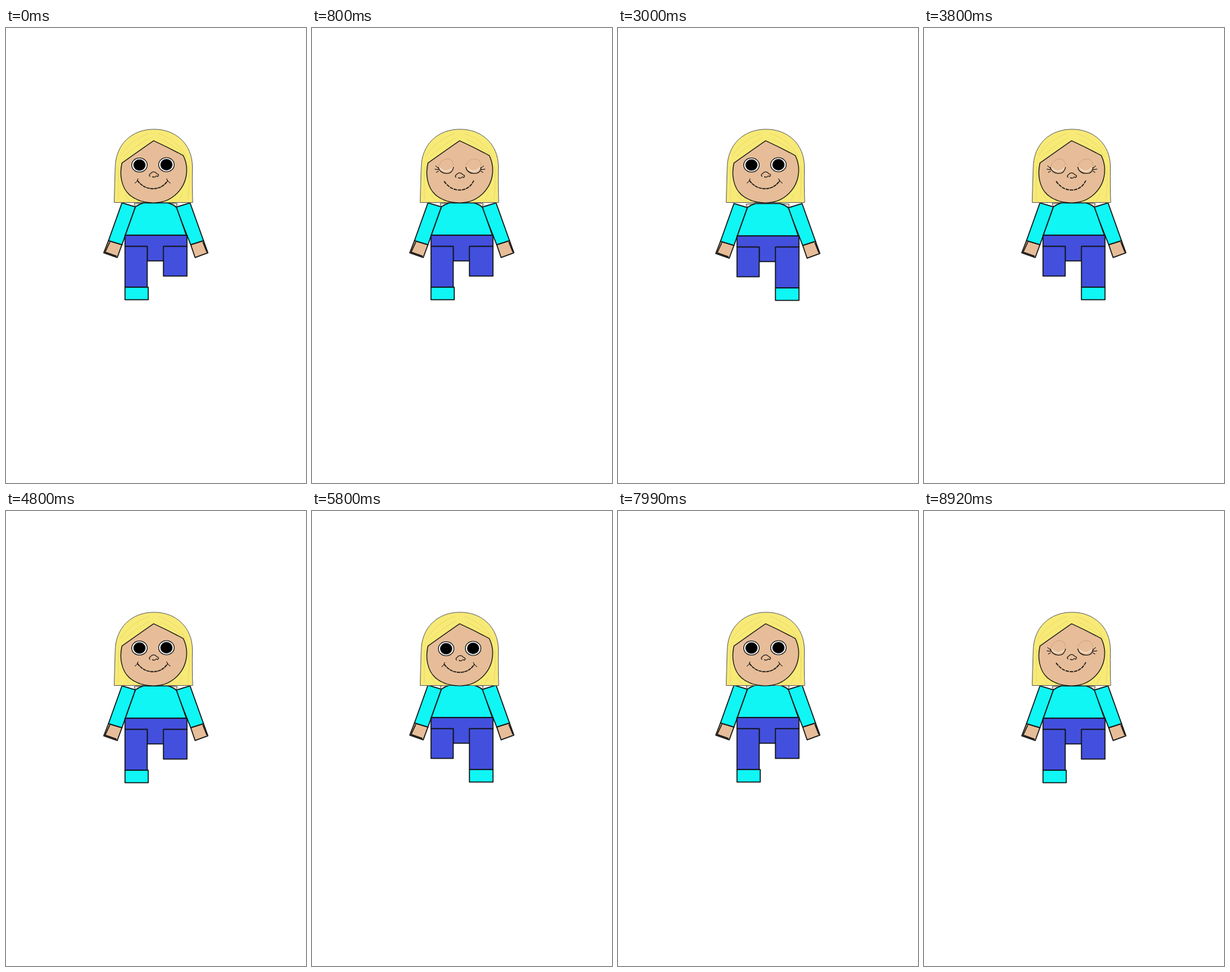
Write an HTML page that moves like this. It is 445 by 674 pixels and loops after 8.99 s.

```html
<!DOCTYPE html>
<html lang="en">
<head>
<meta charset="utf-8">
<title>Walking girl</title>
<style>
  html, body { margin: 0; width: 100%; height: 100%; overflow: hidden; background: #fff; }
  svg { display: block; }
  .shirt { fill: #10f6f5; }
  .jeans { fill: #4250dd; }
  .skin { fill: #e6bd98; }
  .line { fill: none; }
</style>
</head>
<body>
<svg width="445" height="674" viewBox="0 0 445 674" stroke="#111" stroke-width="1.5" stroke-linejoin="round">
  <g id="body">
    <path class="skin" d="M152 315L172 321L165 340L145 333Z"/>
    <path class="skin" d="M293 315L274 321L280.500 340L299.500 333Z"/>
    <path class="line" d="M154 317L147 332L164 338M292 317L298 332"/>
    <path d="M190 260L203 259L192 265ZM254 260L241 259L253 265Z" fill="#f3e6d5" stroke-width=".7"/>
    <path class="shirt" d="M172 259L192 265L172 321L152 315Z"/>
    <path class="shirt" d="M273 259L252 265.500L274 321L293 315Z"/>
    <path class="shirt" d="M177 307L192 265Q197 261 204 259H240Q248 261 253 266L267.500 307Z"/>
    <path class="jeans" d="M176.500 307H268.500V323.500H234V345H209.500V323.500H176.500Z"/>
    <g id="leftDown">
      <path class="jeans" d="M176.500 323.500H209.500V384H176.500ZM233.500 323.500H268.500V367.500H233.500Z"/>
      <path class="shirt" d="M176.500 384H211V402.500H176.500Z"/>
    </g>
    <g id="rightDown">
      <path class="jeans" d="M176.500 323.500H209.500V367.500H176.500ZM233.500 323.500H268.500V384H233.500Z"/>
      <path class="shirt" d="M233.500 384H268.500V402.500H233.500Z"/>
    </g>
  </g>

  <path d="M160.500 258.500Q161 235 162 208C162 172 187 150 219.500 150S276 172 276.500 205Q276 235 277 258.500Z" fill="#f8ea76" stroke="#666" stroke-width="1"/>
  <path class="line" d="M167 205Q166 230 167 254M169 190Q184 166 212 156M175 190Q193 174 214 162M226 156Q256 166 268 192M229 164Q249 174 264 188M271 205Q273 230 270 254M176 246L183 256M262 245L256 256" stroke="#eadb70" stroke-width="1"/>
  <path class="skin" d="M219 167Q203 178 172 200C168 217 171 236 183 247Q197 259 219 259C247 259 268 237 268 210Q268 199 263 189Q243 178 219 167Z" stroke-width="1.200"/>

  <g id="open" class="line">
    <g id="eye">
      <ellipse cx="198" cy="203" rx="11.500" ry="10.500" fill="#fff" stroke-width="1.200"/>
      <ellipse cx="198" cy="203" rx="8.300" ry="7.800" fill="#000"/>
    </g>
    <use href="#eye" x="40" y="-.5"/>
    <path id="nose" d="M214 220Q211 218 214 216Q219 210 224 216Q228 217 225 220L222 219M217 220Q219 222 222 220" stroke-width="1.100"/>
    <path d="M195 226Q204 238 218 238T240 226" stroke-width="1.500" stroke-dasharray="5 .7"/>
    <path d="M191 230Q195 228 196 223M238 223Q240 228 244 230" stroke-width="1"/>
  </g>

  <g id="closed" class="line">
    <path d="M188 205Q191 195 200 194T210 204M228 204Q231 195 240 194T251 204" stroke="#cfa780" stroke-width="1"/>
    <path d="M189 207Q198 217 209 207M230 207Q240 217 249 207" stroke="#f5e4d3" stroke-width="1.500"/>
    <path d="M187 206Q190 215 199 215.500T210 206M228 206Q230 215 240 215.500T251 206" stroke-width="1.200"/>
    <path d="M188 210L182 209M188 208L183 204M188 212L184 214M250 210L257 209M250 208L255 204M250 212L254 214" stroke-width="1"/>
    <use href="#nose" y="1.500"/>
    <path d="M196 227Q205 240 219 240T240 226" stroke-width="1.500" stroke-dasharray="5 1.200"/>
  </g>
</svg>
<script>
const LOOP = 8990, STEP = 200, BLINK_CYCLE = 3000;
const part = id => document.getElementById(id);
const show = (id, on) => part(id).setAttribute('display', on ? 'inline' : 'none');
const move = (id, x, y) => part(id).setAttribute('transform', `translate(${x} ${y})`);

// Each pose: end time, eyes shut, x and y offset
const poses = [
  [600, false, 0, 0], [830, true, 0, 0], [1630, false, 1, 1],
  [2600, false, 0, 0], [2930, false, 1, 1], [3000, true, 0, -2]
];

function draw(now) {
  const raw = now % LOOP;
  const t = raw < 5990 ? raw : raw + 10;
  const step = Math.floor(t / STEP);
  show('leftDown', step % 2 === 0);
  show('rightDown', step % 2 === 1);
  move('body', 0, Math.round(0.9 * Math.sin(step / 45 * 2 * Math.PI)));

  const [, shut, x, y] = poses.find(([end]) => t % BLINK_CYCLE < end);
  show('open', !shut);
  show('closed', shut);
  move(shut ? 'closed' : 'open', x, y);
}

function tick() {
  draw(performance.now());
  requestAnimationFrame(tick);
}
tick();
</script>
</body>
</html>
```
